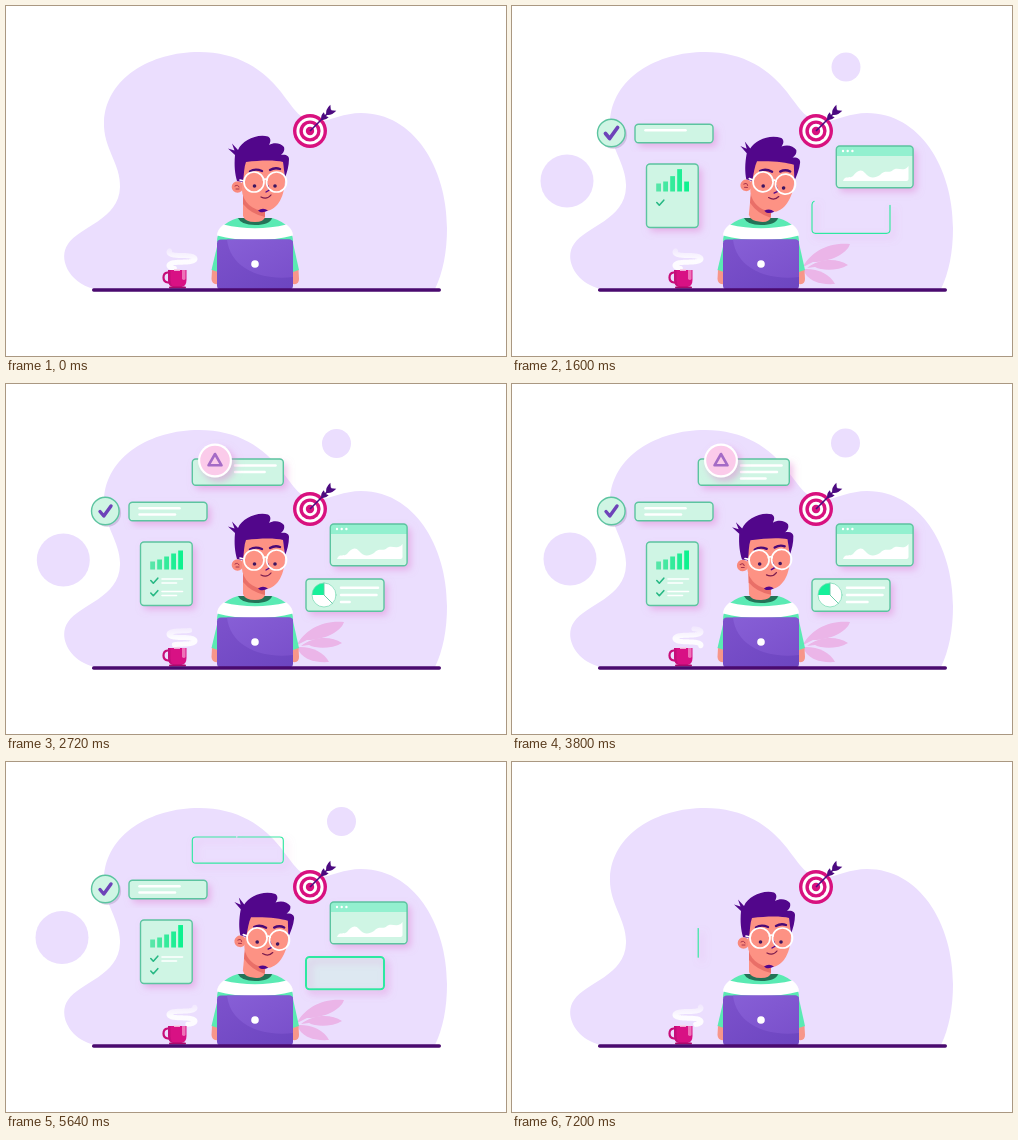
Recreate the animation shown at these times as an HTML page. Size 500 by 350 pixels, loop 7240 ms.

```html
<!DOCTYPE html>
<html lang="en">
<head>
<meta charset="utf-8">
<title>Working at a laptop</title>
<style>
html, body { margin: 0; width: 100%; height: 100%; overflow: hidden; background: #fff; }
svg { display: block; width: 500px; height: 350px; }
.line { fill: none; stroke-linecap: round; stroke-linejoin: round; }
</style>
</head>
<body>
<svg viewBox="0 0 500 350">
  <defs>
    <filter id="shade" x="-30%" y="-40%" width="170%" height="190%">
      <feDropShadow dx="3.500" dy="4" stdDeviation="3.500" flood-color="#e07fd0" flood-opacity=".5"/>
    </filter>
    <linearGradient id="lid" x1="0" y1="0" x2="1" y2="1">
      <stop offset="0" stop-color="#7d52cc"/><stop offset="1" stop-color="#6c45c0"/>
    </linearGradient>
    <linearGradient id="sheen" x1="0" y1="0" x2="1" y2="1">
      <stop offset="0" stop-color="#875fd6"/><stop offset="1" stop-color="#7a50cb"/>
    </linearGradient>
    <linearGradient id="mist" gradientUnits="userSpaceOnUse" x1="0" y1="242" x2="0" y2="262">
      <stop offset="0" stop-color="#fff" stop-opacity=".25"/><stop offset=".6" stop-color="#fff" stop-opacity=".9"/>
    </linearGradient>
  </defs>

  <path fill="#ebdefe" d="M88 283C62 276 52 252 62 238C74 220 113 214 114 181C115 158 97 142 98 116C100 72 145 46 193 46C232 46 258 64 275 86C288 103 295 116 312 116C326 114 338 107 355 107C408 107 441 162 441 222C441 246 437 266 429 283Z"/>
  <circle id="orbA" r="26.5" fill="#ebdefe"/>
  <circle id="orbB" r="14.5" fill="#ebdefe"/>

  <g id="cards"></g>

  <circle cx="304" cy="125" r="17" fill="#d8117f"/>
  <circle cx="304" cy="125" r="13.6" fill="#fff"/>
  <circle cx="304" cy="125" r="10.6" fill="#d8117f"/>
  <circle cx="304" cy="125" r="7.2" fill="#fff"/>
  <circle cx="304" cy="125" r="4.2" fill="#d8117f"/>
  <g transform="translate(304 125) rotate(-45)" fill="#4c0a80">
    <path d="M0-.8H30V.8H0Z"/>
    <path d="M16 0Q18-3.400 23-3.400L21.500 0L23 3.400Q18 3.400 16 0Z"/>
    <path d="M23 0Q26-4.500 33-4.200L29.500 0L33 4.200Q26 4.500 23 0Z"/>
  </g>

  <g id="leaves" fill="#ebb5e8">
    <path d="M291 261C298 247 315 236 338 238C335 248 318 256 301 256Z"/>
    <path d="M295 262C308 252 325 252 336 259C326 265 310 265 303 261Z"/>
    <path d="M291 263C305 262 318 268 323 278C308 279 295 275 291 263Z"/>
  </g>

  <path fill="#5aeab3" d="M214 228L205.500 264L211 268H287L293 264L285 228Z"/>
  <path fill="#f7968a" d="M206 264L212 266V278Q206 279 205.500 273ZM292.500 264L287 266V278Q293 279 293 273Z"/>
  <path fill="#5aeab3" d="M211 236C211 225 217 216 232 212H266C281 216 287 225 287 236Z"/>
  <path fill="#fff" d="M217.500 218.500Q249 226 280.500 218.500C285 222 287 226 287 229.500Q270 234 249 234Q228 234 211 229.500C211 226 213 222 217.500 218.500Z"/>
  <path fill="#237257" d="M232 212H266Q264 219 249 219Q235 219 232 212Z"/>

  <g id="head">
    <path fill="#fd9284" d="M237 185H259V211Q258 216 249 216Q239 216 237 210Z"/>
    <path fill="#e96f68" d="M237 189L259 206V211Q245 208 237 198Z"/>
    <circle cx="231.500" cy="181" r="5.800" fill="#f9897c"/>
    <path class="line" stroke="#a6344e" stroke-width="1" d="M229 180Q232 178 233 181M230 183h3"/>
    <path fill="#fd9284" d="M236 153H277L279 173C279 189 272 204 260 205C247 205 236 196 236 183Z"/>
    <path fill="#52068b" d="M231 175C229 168 228 160 229 149L222 142.500L228.500 144.500L226 137.500L232 144C236 135 250 127.500 262 130.500C266 133 264 137 263 139C268 136 275 137 278 141C279 145 277 147 275 149C280 148 283 150 283 153C283 160 281 166 279 172L277 156C270 154 255 154 240 156C238 161 238 168 237 176Z"/>
    <path class="line" stroke="#4a0a77" stroke-width="2.400" d="M244 165.500Q249 162 256 165M264 164Q269 161 274 163"/>
    <circle cx="248.500" cy="180" r="1.800" fill="#3c1560"/>
    <circle cx="269" cy="180" r="1.800" fill="#3c1560"/>
    <path class="line" stroke="#52068b" stroke-width="1.400" d="M261 178L263.500 184L260 186"/>
    <path class="line" stroke="#7c1d4e" stroke-width="1.200" d="M255 191Q261 194 265 189"/>
    <path fill="#52068b" d="M252 204.500Q257 201 262 204.500Q258 207 254 206Z"/>
    <g class="line" stroke="#fff" stroke-width="1.700">
      <circle cx="248" cy="176" r="10"/><circle cx="270.500" cy="176" r="10"/>
      <path d="M257.500 174Q259 172 261 174M238 175L234 174"/>
    </g>
  </g>

  <rect x="211" y="233.500" width="76" height="50" rx="4" fill="url(#lid)"/>
  <path fill="url(#sheen)" d="M221 233.500C224 262 255 275 287 271V237.500Q287 233.500 283 233.500Z"/>
  <circle cx="249" cy="258" r="3.800" fill="#fff"/>

  <path id="steam" class="line" stroke="url(#mist)" stroke-width="5"/>
  <path class="line" stroke="#c70d78" stroke-width="2.200" d="M163 266.500H161.500Q157.500 267 157.500 271.500T162 276.500H164"/>
  <path fill="#d81184" d="M162 264H180.500V274Q180.500 280 175.500 281H167Q162 280 162 274Z"/>
  <path fill="#a90a6c" d="M162 264H164.500V274Q165 280 168 281H167Q162 280 162 274Z" opacity=".4"/>
  <path fill="#ee72b8" d="M176 264H179.500V273Q178 275 176 273Z"/>
  <path fill="#f7d3ea" d="M168 263h6v1.800h-6Z"/>
  <rect x="163" y="280.500" width="17" height="2" rx="1" fill="#a90a6c"/>
  <rect x="86" y="282.300" width="349" height="3.500" rx="1.700" fill="#4a0a6f"/>
</svg>

<script>
const LOOP = 7240, TURN = 3720, STEP = 40;
const MINT = '#cff5e4', EDGE = '#5cc4a0', GLOW = '#2fe8a2';
const byId = id => document.getElementById(id);
const parts = [];   // functions of the folded time u

const clamp = v => Math.max(0, Math.min(1, v));
const span = (u, a, b) => clamp((u - a) / (b - a));
const easeOut = p => 1 - (1 - p) ** 2;
const backOut = (p, s = 1.7) => p <= 0 ? 0 : 1 + (s + 1) * (p - 1) ** 3 + s * (p - 1) ** 2;

function add(parent, tag, attrs) {
  const el = document.createElementNS('http://www.w3.org/2000/svg', tag);
  set(el, attrs);
  parent.appendChild(el);
  return el;
}
function set(el, attrs) {
  for (const k in attrs) el.setAttribute(k, attrs[k]);
}
function scaleAt(el, x, y, sx, sy = sx) {
  el.setAttribute('transform', `translate(${x} ${y}) scale(${sx} ${sy}) translate(${-x} ${-y})`);
}
function track(keys, t) {
  let i = 1;
  while (i < keys.length - 1 && t > keys[i][0]) i++;
  const a = keys[i - 1], b = keys[i];
  const p = span(t, a[0], b[0]), e = p * p * (3 - 2 * p);
  return a.slice(1).map((v, k) => v + (b[k + 1] - v) * e);
}

// Outline grows both ways from a point on the edge, then the fill fades in.
function card(x, y, w, h, from, draw, fill) {
  const g = add(byId('cards'), 'g', {});
  const box = { x, y, width: w, height: h, rx: 3.5 };
  const body = add(g, 'rect', { ...box, fill: MINT, filter: 'url(#shade)' });
  const top = add(g, 'g', {});
  const edge = add(g, 'rect', {
    ...box, class: 'line', pathLength: 1, stroke: GLOW, filter: 'url(#shade)'
  });
  const done = add(g, 'rect', { ...box, class: 'line', stroke: EDGE, 'stroke-width': 1.4 });
  parts.push(u => {
    const p = easeOut(span(u, ...draw)), f = span(u, ...fill);
    set(edge, {
      'stroke-dasharray': p < 1 ? `${p} ${1 - p}` : 'none',
      'stroke-dashoffset': p / 2 - from,
      'stroke-width': 1.2 + .8 * Math.sin(Math.PI * f),
      opacity: p > 0 && f < 1 ? 1 : 0
    });
    body.setAttribute('opacity', f);
    top.setAttribute('opacity', f);
    done.setAttribute('opacity', span(u, fill[1] - 60, fill[1]));
  });
  return top;
}

function stroke(parent, d, color, width, a, b) {
  const el = add(parent, 'path', { d, class: 'line', stroke: color, 'stroke-width': width, pathLength: 1 });
  parts.push(u => {
    const p = span(u, a, b);
    set(el, { 'stroke-dasharray': p < 1 ? `${p} 2` : 'none', opacity: p > 0 ? 1 : 0 });
  });
}
const bar = (parent, x, y, end, a, b, width = 2.5) =>
  stroke(parent, `M${x} ${y}H${end}`, '#fff', width, a, b);

function pop(parent, x, y, a, b) {
  const g = add(parent, 'g', {});
  parts.push(u => scaleAt(g, x, y, backOut(span(u, a, b))));
  return g;
}

// Report sheet
const sheet = card(134.5, 158, 51.7, 63.5, .31, [218, 550], [500, 780]);
[8, 10, 13, 16, 19].forEach((h, i) => {
  const r = add(sheet, 'rect', {
    x: 144.2 + i * 7, y: 185.5 - h, width: 4.8, height: h,
    fill: `hsl(154 ${74 + i * 4}% ${62 - i * 3}%)`
  });
  parts.push(u => scaleAt(r, 0, 185.5, 1, backOut(span(u, 1175 + i * 100, 1475 + i * 100), 4.2)));
});
[[196, 1500, 1650], [208.5, 1660, 1840]].forEach(([y, a, b]) => {
  stroke(sheet, `M144.800 ${y + .5}l2.500 2.700 4.500-5`, '#27b884', 1.6, a, a + 80);
  bar(sheet, 156, y - 1, 176.5, b - 40, b + 60, 1.6);
  bar(sheet, 156, y + 3, 170.5, b + 20, b + 110, 1.6);
});

// Chart window
const win = card(324.3, 140, 76.8, 41.7, .675, [350, 720], [730, 1000]);
add(win, 'path', { d: 'M324.300 150V143.500Q324.300 140 327.800 140H397.600Q401.100 140 401.100 143.500V150Z', fill: '#93f0cf' });
[331, 335.7, 340.4].forEach(cx => add(win, 'circle', { cx, cy: 145, r: 1.2, fill: '#fff' }));
const wave = add(win, 'path', {
  fill: '#fff',
  d: 'M331 175C333 169 338 173 341 170C345 165 349 162 353 167C358 173 363 172 368 169C373 163 377 168 381 164C386 160 391 167 396.500 160V173Q396.500 175 394.500 175Z'
});
parts.push(u => scaleAt(wave, 331, 175, 1, backOut(span(u, 1050, 1500))));

// Task pill and tick
const pill = card(123, 118.2, 78, 18.5, .68, [960, 1220], [1180, 1380]);
bar(pill, 133.5, 124.3, 173.5, 1450, 1600);
bar(pill, 133.5, 130.5, 169, 1620, 1780);
const tick = pop(byId('cards'), 99.5, 127, 950, 1250);
add(tick, 'circle', { cx: 101.3, cy: 129, r: 13.8, fill: '#b9a5cd', opacity: .55 });
add(tick, 'circle', { cx: 99.3, cy: 127, r: 13.8, fill: MINT, stroke: EDGE, 'stroke-width': 1.4 });
const mark = pop(tick, 99.3, 127, 1400, 1750);
add(mark, 'path', { d: 'M94 127.500L97.800 132L105 122', class: 'line', stroke: '#6e43b9', 'stroke-width': 3.4 });

// Pie card
const stats = card(300, 195, 78, 32.3, .677, [1470, 1800], [1700, 1910]);
const pie = pop(stats, 318, 211, 1950, 2250);
add(pie, 'circle', { cx: 318, cy: 211, r: 12, fill: '#fff' });
add(pie, 'path', { d: 'M318 211H306A12 12 0 0 1 318 199Z', fill: '#16f09a' });
add(pie, 'path', { d: 'M318 199V211L326.500 219.500', class: 'line', stroke: '#5cc9a0', 'stroke-width': .9 });
add(pie, 'circle', { cx: 318, cy: 211, r: 12, class: 'line', stroke: '#7fdcb8', 'stroke-width': .8 });
bar(stats, 335, 203.7, 372, 2300, 2480);
bar(stats, 335, 211, 370.5, 2460, 2650);
bar(stats, 335, 218, 355.5, 2640, 2830);

// Notice card and badge
const note = card(186.3, 75, 91, 26.2, .68, [1600, 1820], [1820, 2040]);
bar(note, 229, 81.5, 269.5, 2350, 2550);
bar(note, 229, 88, 265, 2580, 2750);
bar(note, 229, 94.5, 253.5, 2760, 2930);
const badge = pop(byId('cards'), 209, 76.5, 2160, 2560);
add(badge, 'circle', { cx: 209, cy: 76.5, r: 17, fill: '#fff', filter: 'url(#shade)' });
add(badge, 'circle', { cx: 209, cy: 76.5, r: 14.8, fill: '#fbcbea' });
add(badge, 'path', { d: 'M209 70L215.500 81.300H202.500Z', class: 'line', stroke: '#a46bc6', 'stroke-width': 2.6 });

parts.push(u => scaleAt(byId('leaves'), 290, 263, easeOut(span(u, 300, 720))));

const tilt = [[240, 0], [700, 5.5], [1900, 5.5], [2720, 0], [3200, -1.7], [3720, -1.7]];
parts.push(u => byId('head').setAttribute('transform', `rotate(${track(tilt, u)[0]} 250 208)`));

const driftA = [[880, 54.5, 173], [1600, 55, 175], [2720, 57.3, 176], [3800, 58, 175], [5640, 56, 175.5], [6880, 54.5, 173]];
const driftB = [[880, 336, 61], [1600, 334, 61], [2720, 330.5, 59.5], [3800, 333.5, 59], [5640, 335.5, 59.5], [6880, 336, 61]];

// A rising wave whose crossings are flattened into level strands.
function steam(t) {
  const waves = 1.2, turn = 2 * Math.PI;
  let d = '';
  for (let i = 0; i <= 80; i++) {
    const s = i / 80, a = turn * (s * waves + t / 1600 + .45);
    const x = 176 + 13 * Math.cos(a);
    const y = 245.5 + 16 * (s + .85 * Math.sin(2 * a) / (2 * turn * waves));
    d += `${i ? 'L' : 'M'}${x.toFixed(2)} ${y.toFixed(2)}`;
  }
  byId('steam').setAttribute('d', d);
}

function render(now) {
  const t = Math.floor(now % LOOP / STEP) * STEP;
  const u = t < TURN ? t : 2 * TURN - t;
  parts.forEach(f => f(u));
  const grow = backOut(span(u, 560, 820));
  [['orbA', driftA], ['orbB', driftB]].forEach(([id, keys]) => {
    const [x, y] = track(keys, t);
    byId(id).setAttribute('transform', `translate(${x} ${y}) scale(${grow})`);
  });
  steam(t);
}

const start = performance.now();
function loop() {
  render(performance.now() - start);
  requestAnimationFrame(loop);
}
loop();
</script>
</body>
</html>
```
